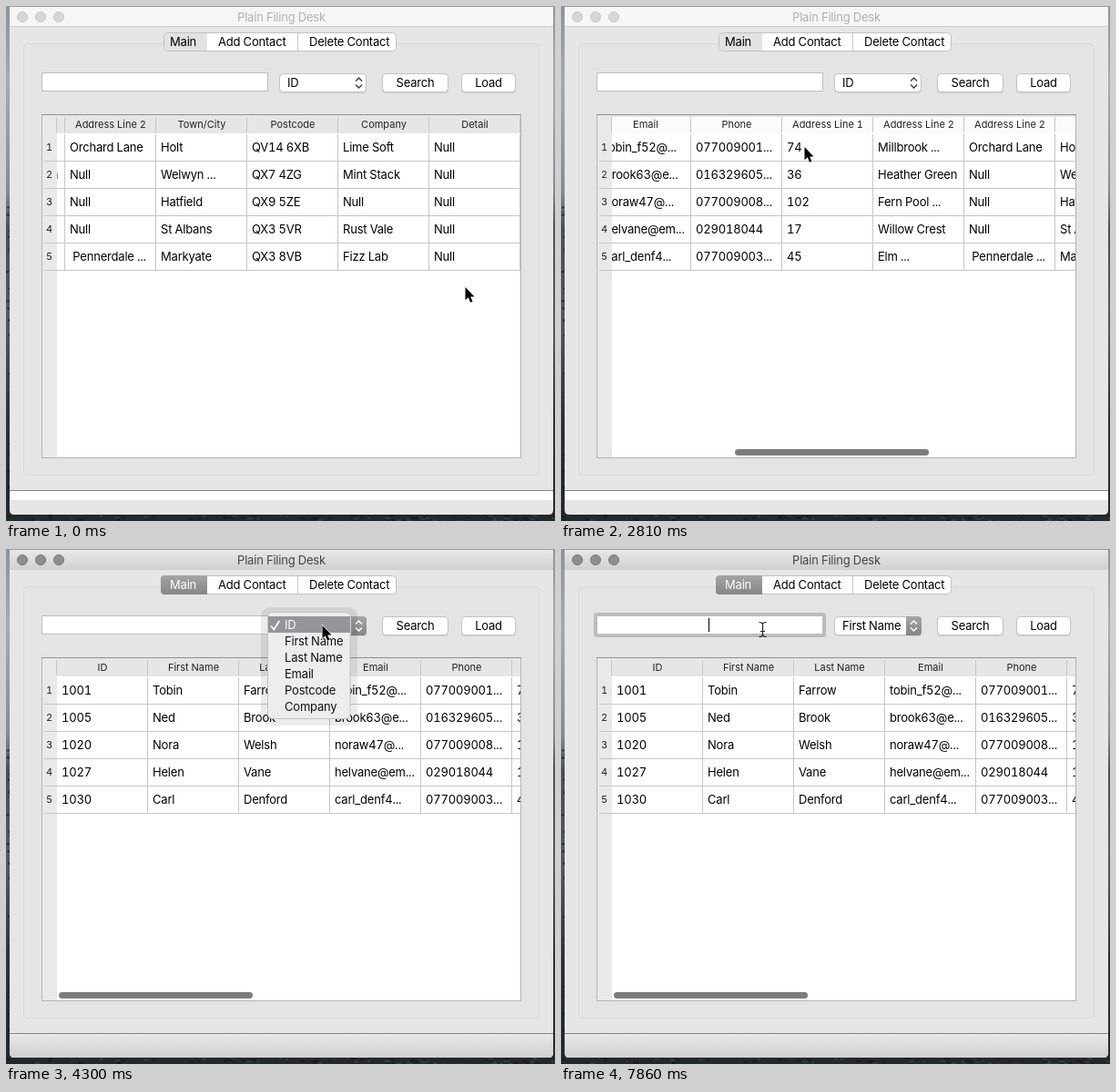
An HTML page that plays this animation: 603 px wide and 566 px high, repeating every 8 s.

```html
<!DOCTYPE html>
<html lang="en">
<head>
<meta charset="utf-8">
<title>Contacts</title>
<style>
html, body { margin: 0; width: 100%; height: 100%; overflow: hidden; background: #e6e6e6; }
svg { display: block; width: 603px; height: 566px; }
text { font: 13px Inter, "Open Sans", sans-serif; letter-spacing: -.2px; font-variant-numeric: tabular-nums; white-space: pre; }
.head { font-size: 11px; letter-spacing: 0; fill: #222; }
.mid { text-anchor: middle; }
.line { fill: none; stroke: #c6c6c6; }
.button { fill: #fff; stroke: #c2c2c2; }
.chevrons { fill: none; stroke: #444; stroke-width: 1.5; }
.light { fill: #d6d6d6; stroke: #c8c8c8; }
.title { fill: #b0b0b0; }
.active .light { fill: #8e8e8e; stroke: #757575; }
.active .title { fill: #444; }
.active .chevrons { stroke: #fff; }
.active .mainTab { fill: #fff; }
.active .idle, svg:not(.active) .awake { display: none; }
</style>
</head>
<body>
<svg id="stage" viewBox="0 0 603 566" xmlns="http://www.w3.org/2000/svg">
  <defs>
    <linearGradient id="wall" x2="0" y2="1">
      <stop offset="0" stop-color="#8d9398"/><stop offset=".15" stop-color="#a6abaf"/>
      <stop offset=".36" stop-color="#858b90"/><stop offset=".43" stop-color="#4b5054"/>
      <stop offset=".62" stop-color="#55595c"/><stop offset=".8" stop-color="#2c3033"/>
      <stop offset="1" stop-color="#23282a"/>
    </linearGradient>
    <linearGradient id="bar" x2="0" y2="1">
      <stop stop-color="#e8e8e8"/><stop offset="1" stop-color="#d0d0d0"/>
    </linearGradient>
    <linearGradient id="dark" x2="0" y2="1">
      <stop stop-color="#a5a5a5"/><stop offset="1" stop-color="#858585"/>
    </linearGradient>
    <clipPath id="view"><rect x="56" y="120" width="509" height="376"/></clipPath>
    <clipPath id="frame"><path d="M4 0H601V554Q601 559 596 559H9Q4 559 4 554Z"/></clipPath>
  </defs>

  <rect width="603" height="566" fill="url(#wall)"/>
  <g id="specks"></g>

  <g clip-path="url(#frame)">
    <rect x="4" width="597" height="559" fill="#e6e6e6"/>
    <g class="idle">
      <rect x="4" y="1" width="597" height="22" fill="#f6f6f6"/>
      <rect x="4" y="533" width="597" height="10" fill="#fff"/>
    </g>
    <g class="awake">
      <rect x="4" y="1" width="597" height="22" fill="url(#bar)"/>
      <rect x="4" y="533" width="597" height="26" fill="url(#bar)"/>
    </g>
    <path d="M4 .5H601" stroke="#9a9a9a"/>
    <path d="M4 22.5H601" stroke="#cdcdcd"/>
    <path d="M4 532.5H601" stroke="#858585"/>
  </g>
  <circle class="light" cx="18" cy="12" r="5.5"/>
  <circle class="light" cx="38" cy="12" r="5.5"/>
  <circle class="light" cx="58" cy="12" r="5.5"/>
  <text class="title mid" x="302.5" y="17">Plain Filing Desk</text>

  <rect x="19.5" y="41.5" width="566" height="474" rx="4" fill="#e4e4e4" stroke="#d8d8d8"/>

  <rect class="button" x="173.5" y="29.5" width="255" height="20" rx="4"/>
  <path class="idle" d="M221 30H178Q174 30 174 34V45Q174 49 178 49H221Z" fill="#e2e2e2"/>
  <path class="awake" d="M221 29H174Q170 29 170 33V46Q170 50 174 50H221Z" fill="url(#dark)"/>
  <path class="line" d="M320.5 30V49"/>
  <text class="mainTab" x="180" y="44">Main</text>
  <text x="233" y="44">Add Contact</text>
  <text x="333" y="44">Delete Contact</text>

  <rect id="focus" x="37.5" y="71.5" width="252" height="24" rx="2" fill="none" stroke="#bcbcbc" stroke-width="3"/>
  <rect x="39.5" y="73.5" width="248" height="20" fill="#fff" stroke="#bdbdbd"/>
  <path id="caret" d="M162.5 76V91" stroke="#000"/>

  <g id="buttons"></g>
  <path class="awake" d="M379 74H392Q396 74 396 78V91Q396 95 392 95H379Z" fill="url(#dark)"/>
  <path class="chevrons" d="M384 82.5l3.5-3.5 3.5 3.5M384 86.5l3.5 3.5 3.5-3.5"/>
  <text id="choice" x="309" y="88.500"></text>

  <rect x="39.5" y="119.5" width="526" height="377" fill="#fff"/>
  <rect x="40" y="120" width="525" height="20" fill="#e6e6e6"/>
  <rect x="40" y="120" width="16" height="376" fill="#e9e9e9"/>
  <rect id="paleHead" x="56" y="122" width="509" height="18" fill="#fbfbfb"/>
  <g id="rowNumbers"></g>
  <g clip-path="url(#view)">
    <g id="cells"></g>
    <rect id="thumb" y="487" width="213" height="7" rx="3.5" fill="#7c7c7c"/>
  </g>
  <rect x="39.5" y="119.5" width="526" height="377" fill="none" stroke="#b4b4b4"/>
  <path d="M39 119.5H566" stroke="#909090"/>

  <g id="popup">
    <rect x="280" y="64" width="106" height="130" rx="10" fill="#000" opacity=".08"/>
    <rect x="287.5" y="69.500" width="90.500" height="117" rx="5" fill="#ededed" stroke="#c4c4c4"/>
    <rect id="highlight" x="288" width="90" height="18" fill="#96959a"/>
    <g id="options"></g>
    <path id="check" d="M291 84.5l3.300 4 6-9.500" fill="none" stroke-width="1.700"/>
  </g>

  <path id="arrow" d="M0 0V14.200L3.300 11.200 5.500 16.700 8 15.700 5.700 10.400H10Z" fill="#000" stroke="#fff" stroke-width="1.200" paint-order="stroke"/>
  <path id="beam" d="M-4-7.500Q0-7.500 0-5Q0-7.500 4-7.500M0-5V6M-2.500 2.500H2.500M-4 8.500Q0 8.500 0 6Q0 8.500 4 8.500" fill="none" stroke="#222" stroke-width="1.200"/>
</svg>

<script>
const $ = id => document.getElementById(id);
const label = (x, y, s, cls = '') => `<text class="${cls}" x="${x}" y="${y}">${s}</text>`;
const show = (id, on) => { $(id).style.display = on ? '' : 'none'; };
const move = (id, x, y = 0) => $(id).setAttribute('transform', `translate(${x} ${y})`);

const DURATION = 8000;
const headers = ['ID', 'First Name', 'Last Name', 'Email', 'Phone', 'Address Line 1', 'Address Line 2',
  'Address Line 2', 'Town/City', 'Postcode', 'Company', 'Detail'];
const rows = [
  '1001|Tobin|Farrow|tobin_f52@...|077009001...|74|Millbrook ...|Orchard Lane|Holt|QV14 6XB|Lime Soft|Null',
  '1005|Ned|Brook|brook63@e...|016329605...|36|Heather Green|Null|Welwyn ...|QX7 4ZG|Mint Stack|Null',
  '1020|Nora|Welsh|noraw47@...|077009008...|102|Fern Pool ...|Null|Hatfield|QX9 5ZE|Null|Null',
  '1027|Helen|Vane|helvane@em...|029018044|17|Willow Crest|Null|St Albans|QX3 5VR|Rust Vale|Null',
  '1030|Carl|Denford|carl_denf4...|077009003...|45|Elm ...| Pennerdale ...|Markyate|QX3 8VB|Fizz Lab|Null'
].map(r => r.split('|'));
const options = ['ID', 'First Name', 'Last Name', 'Email', 'Postcode', 'Company'];

// Steps: [start time, values...]
const pointer = [
  [0, 504, 309], [140, 436, 250], [290, 348, 180], [440, 295, 135],
  [730, 283, 112], [880, 262, 93], [1030, 251, 84], [1180, 248, 79],
  [2220, 251, 95], [2370, 260, 132], [2520, 267, 155],
  [3560, 266, 142], [3710, 292, 118], [3860, 326, 97], [4000, 344, 86], [4150, 347, 84],
  [4900, 347, 88], [5050, 346, 94], [5200, 345, 99], [5500, 344, 104],
  [5790, 343, 107], [5940, 343, 111], [6240, 342, 108], [6380, 342, 104],
  [6680, 341, 103], [6820, 341, 101], [7570, 300, 96], [7720, 246, 90], [7860, 221, 88]
];
const scrolling = [[0, 691], [2810, 313], [2960, 0]];
const hovered = [[0, 0], [5050, 1], [5940, 2], [6240, 1]];
const at = (steps, t) => steps.findLast(s => s[0] <= t).slice(1);

function build() {
  let seed = 7;
  const rnd = () => (seed = seed * 16807 % 2147483647) / 2147483647;
  $('specks').innerHTML = Array.from({ length: 130 }, (_, i) => {
    const [x, y] = i < 90 ? [rnd() * 603, 559 + rnd() * 7] : [rnd() * 4, 210 + rnd() * 350];
    return `<rect x="${x}" y="${y}" width="${2 + rnd() * 5}" height="2" fill="${rnd() < .6 ? '#111617' : '#414b48'}" opacity=".6"/>`;
  }).join('');

  $('buttons').innerHTML = [[300, 96, ''], [413, 73, 'Search'], [500, 60, 'Load']].map(([x, w, s]) =>
    `<rect x="${x}" y="75" width="${w}" height="21" rx="4" fill="#cfcfcf"/>
     <rect class="button" x="${x + .5}" y="74.5" width="${w - 1}" height="20" rx="4"/>` +
    label(x + w / 2, 89, s, 'mid')).join('');

  $('rowNumbers').innerHTML = rows.map((_, r) =>
    label(47.5, 159 + r * 30, r + 1, 'head mid') +
    `<path class="line" d="M42 ${170.5 + r * 30}H56"/>`).join('') +
    '<path class="line" d="M55.5 122V139"/>';

  $('cells').innerHTML = headers.map((h, c) => {
    const x = 56 + c * 100;
    return label(x + 50, 134, h, 'head mid') +
      `<path class="line" d="M${x + 99.5} 122V139M${x + 99.5} 141V291"/>` +
      rows.map((row, r) => label(x + 5, 160 + r * 30, row[c])).join('');
  }).join('') + rows.map((_, r) => `<path class="line" d="M56 ${170.5 + r * 30}H1256"/>`).join('');

  $('options').innerHTML = options.map((s, i) => label(306, 88 + i * 18, s)).join('');
}

function render(t) {
  const [x, y] = at(pointer, t);
  const [scroll] = at(scrolling, t);
  const [hover] = at(hovered, t);
  const active = t >= 4150;
  const typing = t >= 7860;

  $('stage').classList.toggle('active', active);
  move('cells', -scroll);
  move('thumb', 58 + scroll * .425);
  show('thumb', t >= 2810);
  show('paleHead', t >= 2810 && !active);

  show('popup', t >= 4300 && t < 7570);
  move('highlight', 0, 74 + hover * 18);
  [...$('options').children].forEach((o, i) => o.setAttribute('fill', i === hover ? '#fff' : '#111'));
  $('check').setAttribute('stroke', hover ? '#111' : '#fff');
  $('choice').textContent = t >= 7570 ? 'First Name' : 'ID';

  show('focus', typing);
  show('caret', typing);
  const beam = t >= 7720;
  show('beam', beam);
  show('arrow', !beam);
  move(beam ? 'beam' : 'arrow', x + .5, y);
}

build();
const start = performance.now();
function tick() {
  render((performance.now() - start) % DURATION);
  requestAnimationFrame(tick);
}
tick();
</script>
</body>
</html>
```
